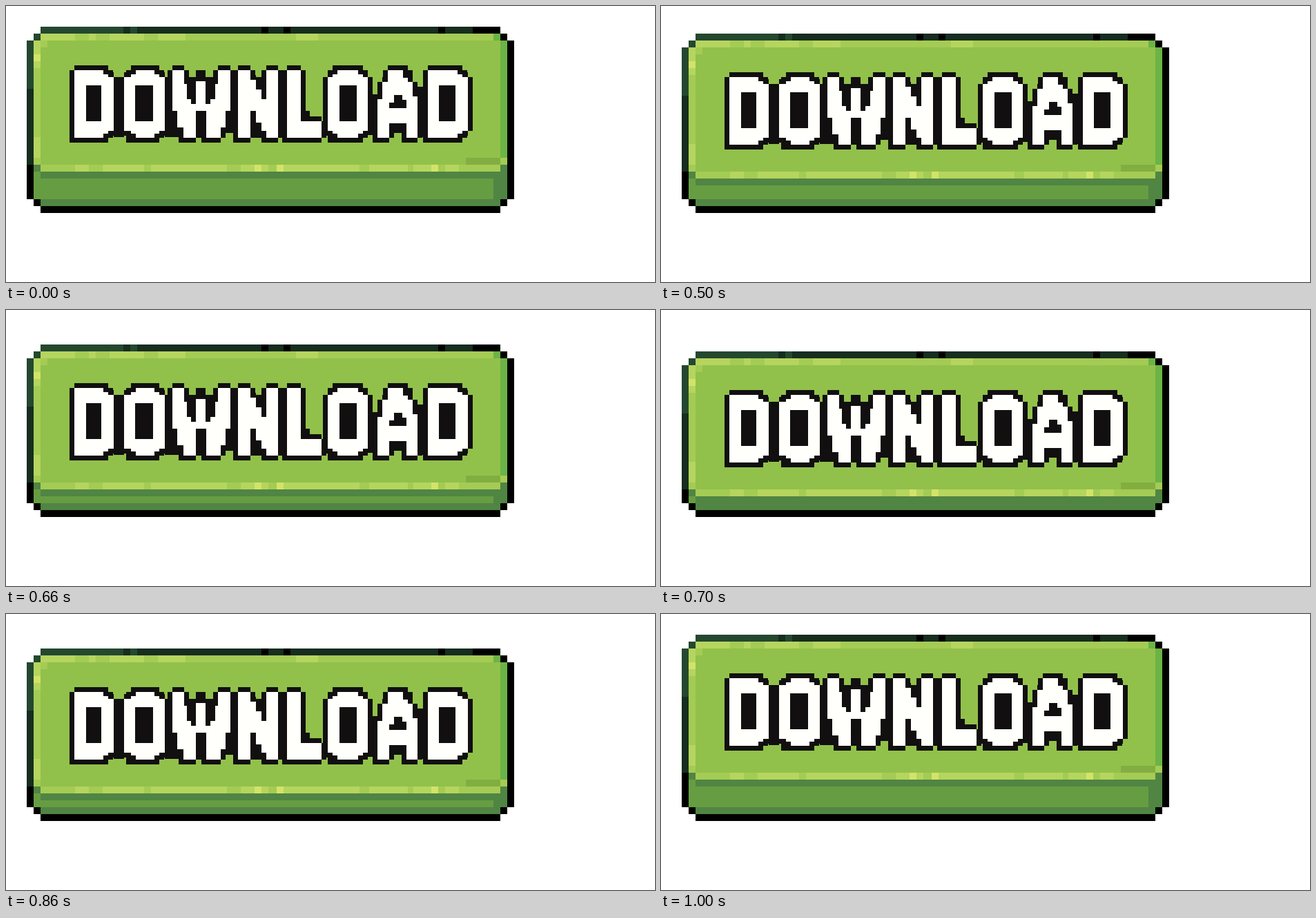
Write an HTML page with a canvas that moves like this. It is 940 px wide and 400 px high and loops after 1100 ms.

```html
<!DOCTYPE html>
<html lang="en">
<head>
<meta charset="utf-8">
<title>Download button</title>
<style>
html, body { margin: 0; width: 100%; height: 100%; overflow: hidden; background: #fff; }
canvas { display: block; }
</style>
</head>
<body>
<canvas width="940" height="400" aria-label="DOWNLOAD"></canvas>
<script>
const ctx = document.querySelector('canvas').getContext('2d');
const face = '#91c14b', mid = '#a4cb54', light = '#b5d55e', yellow = '#d3e369';
const edge = '#6bb446', shade = '#82ae41', base = '#669d42', dark = '#508543';
const pine = '#24482f', deep = '#172d1f', black = '#000', ink = '#110f10', paper = '#fffffb';

const letters = new Path2D([
  'M99 93H148V103H156V181H148V191H99Z',
  'M181 93H222V103H230V181H222V191H181V181H171V103H181Z',
  'M241 93H258V113H262V135H268V142H275V109H289V142H296V135H303V113H307V93H325V152H318V176H311V191H290V152H275V191H257V176H248V152H241Z',
  'M336 93H354V107H362V121H370V135H377V93H394V191H377V181H370V169H362V152H354V191H336Z',
  'M407 93H427V167H457V191H407Z',
  'M473 93H517V103H524V181H517V191H473V181H466V103H473Z',
  'M553 93H582V110H589V131H596V191H580V170H555V191H538V135H545V110H553Z',
  'M611 93H661V103H669V181H661V191H611Z'
].join(''));
// Dark areas between and behind the letters, then the holes in D, O and A
const gaps = new Path2D('M156 103H171V190H156ZM230 103H257V190H230ZM258 103H275V93H289V103H307V142H258ZM275 152H290V191H275ZM318 103H336V184H318ZM354 103H377V191H354ZM427 152H440V167H427ZM524 128H538V187H524ZM555 170H580V184H555ZM596 117H611V190H596Z');
const holes = new Path2D('M116 115H138V167H116ZM187 115H213V167H187ZM483 115H508V167H483ZM562 129H574V136H580V148H555V140H562ZM627 115H651V167H627Z');
// Left edges of the notched corners of D and O
const notches = [141, 181, 215, 473, 510, 654];

function box(color, x1, y1, x2, y2) {
  ctx.fillStyle = color;
  ctx.fillRect(x1, y1, x2 - x1, y2 - y1);
}

function row(color, y, ...spans) {
  for (let i = 0; i < spans.length; i += 2) box(color, spans[i], y, spans[i + 1], y + 10);
}

function column(color, x, ...spans) {
  for (let i = 0; i < spans.length; i += 2) box(color, x, spans[i], x + 10, spans[i + 1]);
}

function fill(path, color, dx = 0, dy = 0) {
  ctx.save();
  ctx.translate(dx, dy);
  ctx.fillStyle = color;
  ctx.fill(path);
  ctx.restore();
}

function drawBase(dy) {
  box(black, 30, 230 + dy, 736, 280);
  box(black, 40, 280, 726, 290);
  box(black, 50, 290, 716, 300);
  box(dark, 40, 230 + dy, 726, 280);
  box(dark, 50, 280, 716, 290);
  box(base, 40, 240 + dy, 50, 280);
  if (dy < 30) box(base, 40, 250 + dy, 706, 280);
}

function drawCap() {
  row(deep, 30, 50, 676);
  row(pine, 30, 50, 170, 180, 190);
  row(black, 30, 370, 380, 402, 412, 626, 636, 676, 716);
  row(pine, 40, 40, 50);
  row(black, 40, 716, 726);
  column(pine, 30, 50, 120);
  column(deep, 30, 120, 230);
  column(black, 726, 50, 230);

  box(face, 50, 50, 716, 230);
  row(mid, 40, 50, 706);
  row(light, 40, 50, 100, 120, 130, 150, 200, 220, 260, 420, 452);
  row(edge, 40, 706, 716);
  column(edge, 716, 50, 220);
  column(mid, 716, 220, 230);
  column(mid, 40, 50, 230);
  column(light, 40, 50, 90, 190, 220);
  column(yellow, 40, 70, 80);
  row(mid, 50, 50, 60);
  row(shade, 220, 666, 716);

  row(mid, 230, 50, 716);
  row(light, 230, 100, 120, 140, 200, 210, 320, 340, 360, 370, 380, 402, 512, 526, 582, 590, 616, 636, 656);
  row(yellow, 230, 360, 370, 392, 402, 616, 626);
}

function drawLabel() {
  for (const [dx, dy] of [[-7, 0], [7, 0], [0, -7], [0, 7], [-7, 7]]) fill(letters, ink, dx, dy);
  fill(gaps, ink);
  fill(letters, paper);
  fill(holes, ink);
  for (const x of notches) {
    box(ink, x, 93, x + 7, 99);
    box(ink, x, 185, x + 7, 191);
  }
  box(ink, 575, 93, 582, 104);
}

function draw(now) {
  const step = Math.max(0, Math.floor((now % 1100) / 100) - 4);
  const dy = 10 * (3 - Math.abs(3 - step));
  box('#fff', 0, 0, 940, 400);
  drawBase(dy);
  ctx.save();
  ctx.translate(0, dy);
  drawCap();
  drawLabel();
  ctx.restore();
  requestAnimationFrame(draw);
}

draw(0);
</script>
</body>
</html>
```
